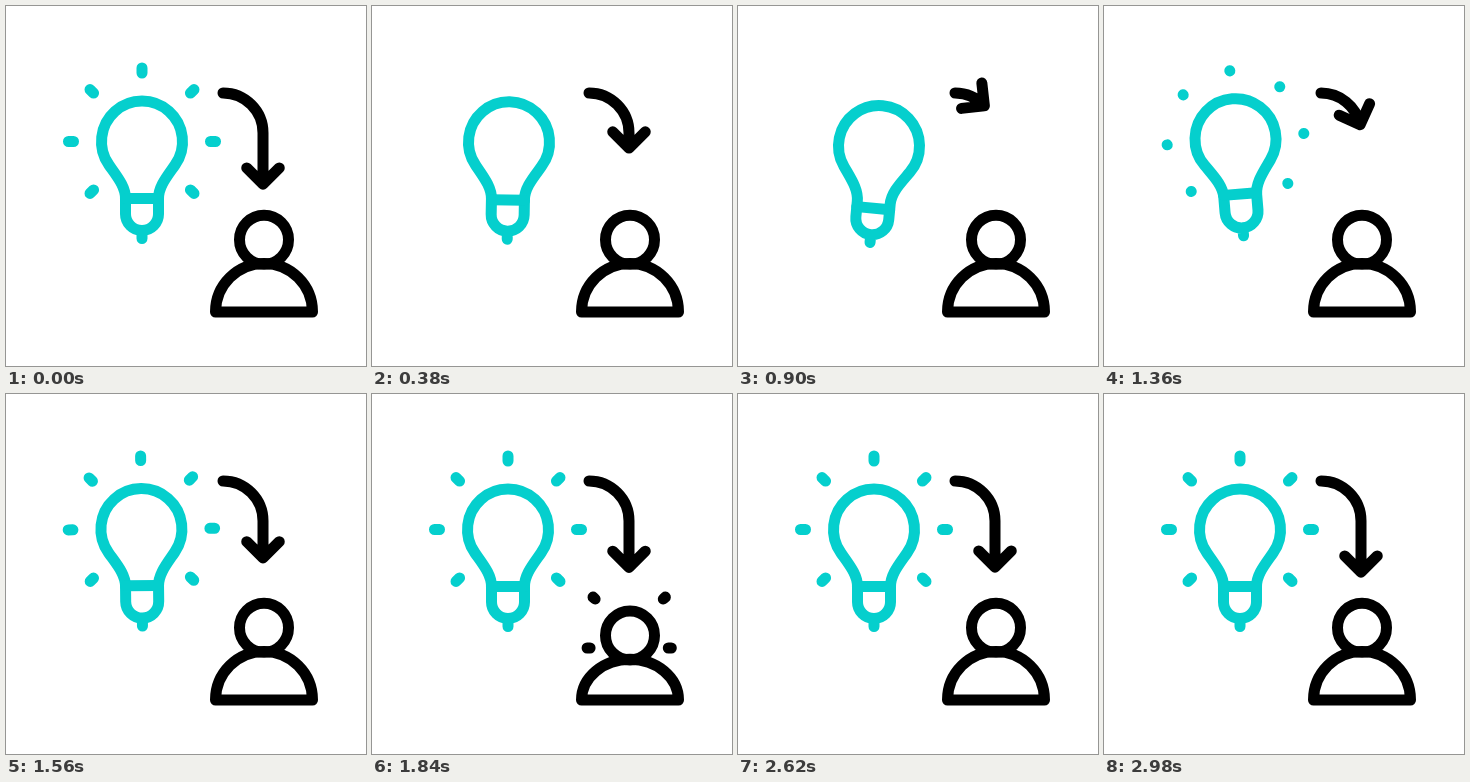
These frames come from a looping animation (360x360 px, 3220 ms). An HTML page:

```html
<!DOCTYPE html>
<html lang="en">
<head>
<meta charset="utf-8">
<title>Idea transfer</title>
<style>
  html, body { margin: 0; width: 100%; height: 100%; overflow: hidden; background: #fff; }
  svg { display: block; width: 100%; height: 100%; }
  g { fill: none; stroke-width: 11; stroke-linecap: round; stroke-linejoin: round; }
</style>
</head>
<body>
<svg viewBox="0 0 360 360">
  <g id="bulb" stroke="#05cfcd">
    <path d="M-16.5 57C-16.5 45-25 35-33 23.5A40.5 40.5 0 1 1 33 23.5C25 35 16.5 45 16.5 57V72.5A16.5 16.5 0 0 1-16.5 72.5ZM0 90V97"/>
    <path id="collar"/>
    <path id="bulbRays"/>
  </g>
  <g stroke="#000">
    <path id="arrow"/>
    <circle id="head" cx="258" r="24.5"/>
    <path id="body"/>
    <path id="personRays"/>
  </g>
</svg>
<script>
const LOOP = 3220;
const QUARTER = 20 * Math.PI; // length of the arrow's bend, radius 40
const $ = id => document.getElementById(id);
const setPath = (id, d) => $(id).setAttribute('d', d);

const smooth = p => p * p * (3 - 2 * p);
const quadIn = p => p * p;
const cubicOut = p => 1 - (1 - p) ** 3;

// Easing curve with flat ends: bezier(x1, 0, x2, 1)
const flatBezier = (x1, x2) => p => {
  let lo = 0, hi = 1;
  for (let i = 0; i < 20; i++) {
    const u = (lo + hi) / 2, v = 1 - u;
    if (3 * u * v * v * x1 + 3 * u * u * v * x2 + u ** 3 < p) lo = u; else hi = u;
  }
  return smooth(lo);
};
const swing = flatBezier(.33, .4);
const retract = flatBezier(.17, .2);

const progress = (t, from, to) => Math.min(1, Math.max(0, (t - from) / (to - from)));

// Keys are [from, to, value, easing]; each leads from the previous value.
function track(t, value, keys) {
  for (const [from, to, next, ease] of keys) {
    if (t < from) break;
    value += (next - value) * ease(progress(t, from, to));
  }
  return value;
}

const tiltKeys = [[220, 900, 1, swing], [1100, 1360, -.9, smooth], [1360, 1620, 0, smooth]];
const arrowKeys = [[220, 900, 33, retract], [1100, 1620, 118, quadIn],
                   [1620, 2160, 107, cubicOut], [2420, 2980, 114, smooth]];
const squashKeys = [[1580, 1800, 8, smooth], [1800, 2160, 0, smooth]];
const rayKeys = [[220, 340, 0, smooth], [1340, 1600, 5, smooth]];

function drawBulb(t) {
  const k = track(t, 0, tiltKeys);
  const y = 135.5 + 3.5 * k + k * k;
  $('bulb').setAttribute('transform', `translate(${136 + 5 * k} ${y}) rotate(${5.3 * k})`);
  const collarY = 57 + 3.7 * k + 1.7 * k * k;
  setPath('collar', `M-16.5 ${collarY}H16.5`);

  let rays = '';
  if (t < 340 || t >= 1340) {
    const length = track(t, 5, rayKeys) + .01;
    for (let i = -3; i <= 3; i++) {
      const a = i * Math.PI / 4, x = Math.sin(a), y = -Math.cos(a);
      rays += `M${68.5 * x} ${68.5 * y}l${length * x} ${length * y}`;
    }
  }
  setPath('bulbRays', rays);
}

function drawArrow(t) {
  const length = track(t, 114, arrowKeys);
  const bend = Math.min(length, QUARTER) / 40;
  const x = 217 + 40 * Math.sin(bend);
  const y = 127 - 40 * Math.cos(bend) + Math.max(0, length - QUARTER);
  const heading = Math.min(length - 6, QUARTER) / 40;
  const barb = turn => {
    const a = heading + Math.PI + turn * Math.PI / 4;
    return `${x + 23 * Math.cos(a)} ${y + 23 * Math.sin(a)}`;
  };
  const curveEnd = `${x} ${127 - 40 * Math.cos(bend)}`;
  setPath('arrow', `M217 87A40 40 0 0 1 ${curveEnd}L${x} ${y}M${barb(-1)}L${x} ${y}L${barb(1)}`);
}

function drawPerson(t) {
  const squash = track(t, 0, squashKeys);
  $('head').setAttribute('cy', 233.7 + squash);
  setPath('body', `M209.5 306A48.5 ${48.5 - squash} 0 0 1 306.5 306Z`);

  let rays = '';
  if (t >= 1660 && t < 2270) {
    const p = progress(t, 1660, 2200);
    const tip = 1 - (1 - p) ** 1.5;
    for (const side of [-1, 1]) {
      const flat = q => `${257.2 + side * (31 + 24.2 * q)} 254`;
      const slanted = q => `${257.2 + side * (28.5 + 16.7 * q)} ${210 - 15 * q}`;
      for (const at of [flat, slanted]) rays += `M${at(p)}L${at(tip + .001)}`;
    }
  }
  setPath('personRays', rays);
}

function frame(now) {
  const t = now % LOOP;
  drawBulb(t);
  drawArrow(t);
  drawPerson(t);
  requestAnimationFrame(frame);
}
frame(0);
</script>
</body>
</html>
```
